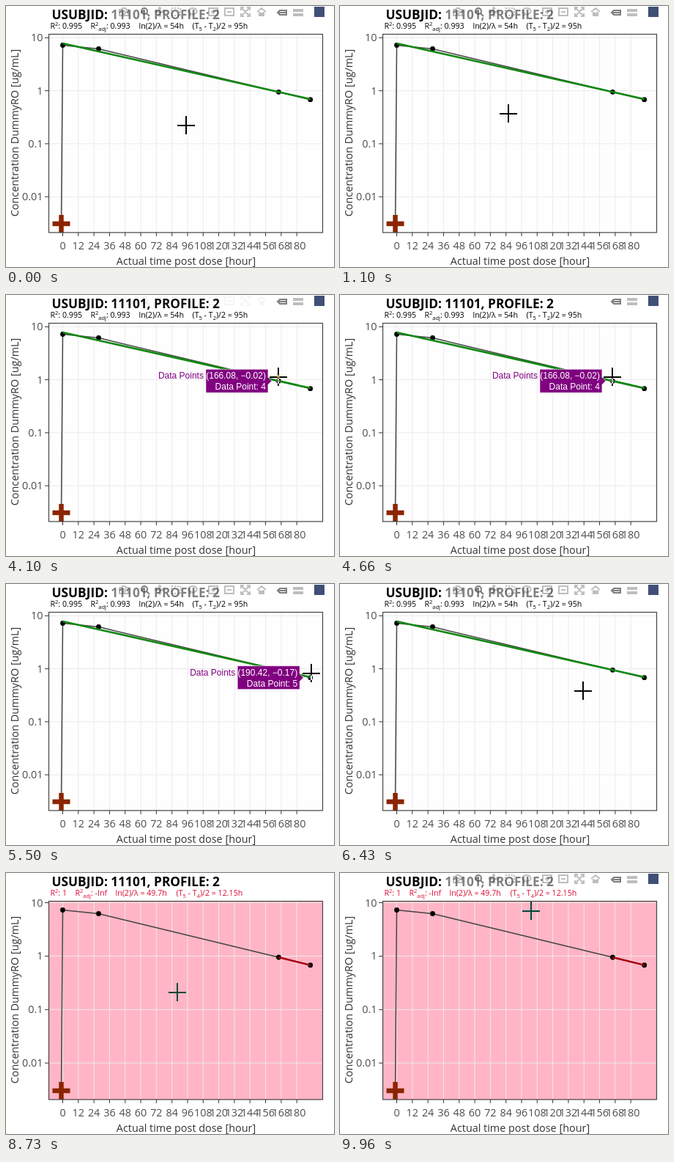
Recreate the animation shown at these times as an HTML page. Size 448x356 px, loop 10 s.

```html
<!DOCTYPE html>
<html lang="en">
<head>
<meta charset="utf-8">
<title>Half-life selection plot</title>
<style>
  html, body { margin: 0; width: 100%; height: 100%; overflow: hidden; background: #fff; }
  svg { display: block; width: 448px; height: 356px; background: #fff; font-family: "Open Sans", sans-serif; }
  .title { font-weight: 700; font-size: 17.27px; }
  .stats { font-size: 10.63px; white-space: pre; }
  .small { font-size: 7.44px; }
  .axis { font-size: 14.4px; fill: #333; text-anchor: middle; }
  .tick { font-size: 14.4px; fill: #4d4d4d; }
  .hover { font: 12px "Liberation Sans", Arial, sans-serif; text-anchor: end; }
  .icon { fill: none; stroke: #444; stroke-width: 2; opacity: .35; }
  .icon.on { opacity: .7; }
</style>
</head>
<body>
<svg id="stage" viewBox="0 0 448 356">
  <rect width="448" height="356" fill="#fff"/>
  <g id="plot"><g id="before"></g><g id="after"></g><g id="bar"></g></g>
  <g id="tip4"></g>
  <g id="tip5"></g>
  <path id="cursor" d="M-1-12h2v12h11v2h-11v11h-2v-11h-11v-2h11z" fill="#fff" style="mix-blend-mode:difference"/>
  <circle id="spot" cx="372" cy="111" r="2" fill="#c0ac4c"/>
</svg>
<script>
const LOOP = 10000;
const $ = id => document.getElementById(id);
const hourX = h => 77.5 + h * 1.776;
const line = (d, color, width) =>
  `<path d="${d}" fill="none" stroke="${color}" stroke-width="${width}" stroke-linejoin="round"/>`;
const text = (cls, x, y, s, extra = '') => `<text class="${cls}" x="${x}" y="${y}" ${extra}>${s}</text>`;
const sup = s => `<tspan class="small" dy="-4.5">${s}</tspan>`;
const sub = s => `<tspan class="small" dy="3">${s}</tspan>`;

function stats(color, [r2, adj, half, first, span], xs) {
  const parts = [
    `R${sup(2)}<tspan dy="4.5">: ${r2}</tspan>`,
    `R${sup(2)}<tspan class="small" dy="7.5">adj</tspan><tspan dy="-3">: ${adj}</tspan>`,
    `ln(2)/λ = ${half}h`,
    `(T${sub(5)}<tspan dy="-3"> - T</tspan>${sub(first)}<tspan dy="-3">)/2 = ${span}h</tspan>`
  ];
  return parts.map((s, i) => text('stats', xs[i], 31, s, `fill="${color}"`)).join('');
}

function chart({ panel, top, step, ys, fit, fitColor, fitWidth, info }) {
  let s = `<rect x="58.5" y="38.5" width="374" height="270.5" fill="${panel}"/>`;
  let ticks = '';
  for (let h = 0; h <= 180; h += 12) {
    const x = hourX(h);
    s += line(`M${x} 39V309`, '#ebebeb', 1);
    ticks += line(`M${x} 309v5`, '#333', 1) + text('tick', x, 332, h, 'text-anchor="middle"');
  }
  ['10', '1', '0.1', '0.01'].forEach((label, i) => {
    const y = top + i * step;
    s += line(`M59 ${y}H432`, '#ebebeb', 1);
    ticks += line(`M53 ${y}h5`, '#333', 1) + text('tick', 50.5, y + 5, label, 'text-anchor="end"');
  });
  const pts = [0, 27.6, 166.08, 190.42].map((h, i) => [hourX(h), ys[i]]);
  s += line('M75.5 297L' + pts.join('L'), '#444', 1.5);
  s += pts.map(([x, y]) => `<circle cx="${x}" cy="${y}" r="3.4"/>`).join('');
  s += line(fit, fitColor, fitWidth);
  s += line('M63.5 297h24M75.5 285v24', '#8b2500', 6.5);
  s += '<rect x="58.5" y="38.5" width="374" height="270.5" fill="none" stroke="#444" stroke-width="1.2"/>';
  return s + ticks + info +
    text('title', 62.5, 18, 'USUBJID: 11101, PROFILE: 2') +
    text('axis', 246, 353, 'Actual time post dose [hour]') +
    text('axis', 0, 0, 'Concentration DummyRO [ug/mL]', 'transform="translate(17 173) rotate(-90)"');
}

function tip(x, y, value, n) {
  const r = x - 14.5, t = y - 16;
  return `<path d="M${r - 85} ${t}h85v11l5 5l-5 5v11h-85z" fill="#800080" stroke="#fff" stroke-width=".6"/>` +
    text('hover', r - 3, t + 13, `(${value})`, 'fill="#fff"') +
    text('hover', r - 3, t + 28, `Data Point: ${n}`, 'fill="#fff"') +
    text('hover', r - 88, t + 13, 'Data Points', 'fill="#800080"');
}

function toolbar() {
  const icon = (x, d, on = '') => `<path class="icon ${on}" transform="translate(${x} 8)" d="${d}"/>`;
  const box = 'M-6-5h12v10h-12z';
  const left = [
    icon(161, 'M-6-3h3l1-2h4l1 2h3v8h-12zM-2 1a2 2 0 1 0 4 0a2 2 0 1 0-4 0'),
    icon(189, 'M-4-1a4 4 0 1 0 8 0a4 4 0 1 0-8 0M3 2l4 4', 'on'),
    icon(210, 'M-6 0h12M0-6v12M-2-4l2-2l2 2M-2 4l2 2l2-2M-4-2l-2 2l2 2M4-2l2 2l-2 2'),
    `<g stroke-dasharray="2 2">${icon(232, box)}</g>`,
    icon(255, 'M-2 3c-7-2-4-8 2-8s8 6 2 8s-4-3-5 0l-1 3'),
    icon(283, box + 'M-3 0h6M0-3v6'),
    icon(305, box + 'M-3 0h6'),
    icon(327, 'M-6-2v-4h4M2-6h4v4M6 2v4h-4M-2 6h-4v-4M-5-5l10 10M5-5l-10 10'),
    icon(349, 'M-6 0l6-5l6 5M-3 0v5h2v-3h2v3h2v-5')
  ];
  const right = [
    icon(377, 'M-6 1l3-3h9v6h-9zM-4 1h9', 'on'),
    icon(399, 'M-6-3h12v2h-12zM-6 3h12v2h-12z'),
    '<rect x="421" y="1" width="14" height="14" fill="#3f4f75"/>'
  ];
  return '<g id="tools"><rect x="144" width="220" height="21" fill="#fff" opacity=".5"/>' +
    left.join('') + '</g>' + right.join('');
}

$('before').innerHTML = chart({
  panel: '#fefefe', top: 43.3, step: 72.3, ys: [53.5, 58.5, 117.3, 127.7],
  fit: `M77.5 51L${hourX(190.42)} 127`, fitColor: '#118811', fitWidth: 2.7,
  info: stats('#000', ['0.995', '0.993', 54, 2, 95], [60.5, 115.5, 181.5, 254.5])
});
$('after').innerHTML = chart({
  panel: '#ffb5c5', top: 40.5, step: 72.9, ys: [50.5, 55.5, 115, 125.7],
  fit: `M${hourX(166.08)} 115L${hourX(190.42)} 125.7`, fitColor: '#a8000f', fitWidth: 2.4,
  info: stats('#dc0a32', ['1', '-Inf', 49.7, 4, 12.15], [60.5, 94.5, 149.5, 232.5])
});
$('bar').innerHTML = toolbar();
$('tip4').innerHTML = tip(hourX(166.08), 117.3, '166.08, −0.02', 4);
$('tip5').innerHTML = tip(hourX(190.42), 127.7, '190.42, −0.17', 5);

// time, x, y
const path = [
  [0, 246, 162], [560, 246, 162], [600, 230, 146], [1930, 230, 146], [2400, 387, 109],
  [2930, 372, 108], [3400, 372, 108], [3560, 372, 111], [4960, 372, 111], [5480, 417, 121],
  [5800, 417, 121], [6050, 434, 128], [6800, 234, 162], [9260, 234, 162], [9940, 261, 51], [LOOP, 261, 51]
];
const ramp = (t, a, b) => {
  const k = Math.min(1, Math.max(0, (t - a) / (b - a)));
  return k * k * (3 - 2 * k);
};
const show = (id, on) => $(id).style.display = on ? '' : 'none';
const fade = (id, v) => $(id).style.opacity = v;

function draw(t) {
  const i = path.findIndex(p => p[0] > t);
  const [t0, x0, y0] = path[i - 1], [t1, x1, y1] = path[i];
  const k = ramp(t, t0, t1);
  const x = Math.round(x0 + (x1 - x0) * k), y = Math.round(y0 + (y1 - y0) * k);
  $('cursor').setAttribute('transform', `translate(${x} ${y})`);

  const done = t >= 8730;
  show('before', !done);
  show('after', done);
  fade('plot', done ? 1 : 1 - .7 * ramp(t, 6830, 7100));
  fade('bar', done ? ramp(t, 8730, 9030) : 1);
  fade('tools', 1 - ramp(t, 3930, 4150) + ramp(t, 4960, 5260));
  show('tip4', t >= 2250 && t < 5100 && !(t >= 3430 && t < 3530));
  show('tip5', t >= 5250 && t < 6150);
  show('spot', t >= 4000 && t < 4300);
}

function tick() {
  draw(performance.now() % LOOP);
  requestAnimationFrame(tick);
}
tick();
</script>
</body>
</html>
```
